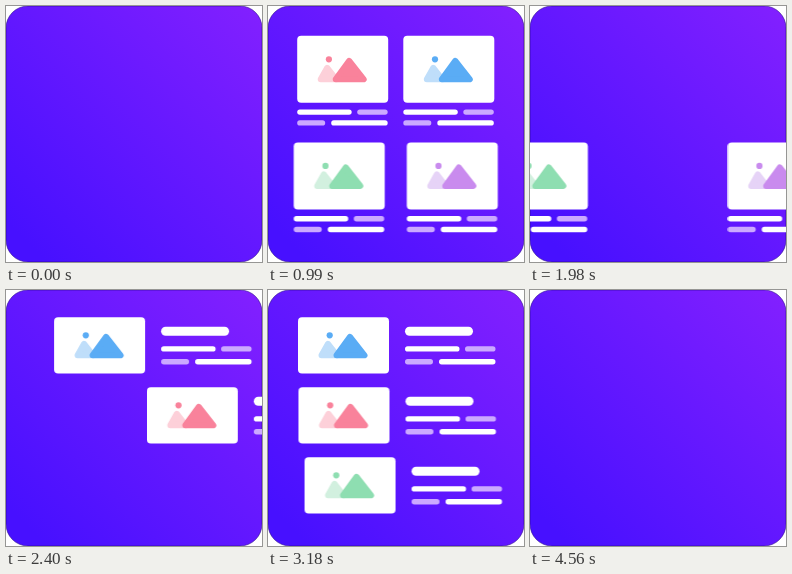
An HTML page that plays this animation: 256 by 256 pixels, repeating every 4620 ms.

```html
<!DOCTYPE html>
<html lang="en">
<head>
<meta charset="utf-8">
<title>Layout switch</title>
<style>
  html, body { margin: 0; width: 100%; height: 100%; overflow: hidden; background: #fff; }
  svg { display: block; width: 100vw; height: 100vh; }
</style>
</head>
<body>
<svg id="stage" viewBox="0 0 256 256">
  <defs>
    <linearGradient id="bg" x1="0" y1="1" x2="1" y2="0">
      <stop offset=".08" stop-color="#4710ff"/>
      <stop offset="1" stop-color="#8320ff"/>
    </linearGradient>
    <clipPath id="tile"><rect width="256" height="256" rx="22"/></clipPath>
  </defs>
  <rect width="256" height="256" rx="22" fill="url(#bg)" stroke="#2a0a8c" stroke-width=".6"/>
  <g id="scene" clip-path="url(#tile)"></g>
</svg>
<script>
const LOOP = 4620;
const WHITE = '#fff', LILAC = '#cba9ff';
const PINK = ['#f9829b', '#fdd0d9'];
const BLUE = ['#5aacf5', '#bfdefa'];
const GREEN = ['#8edeb1', '#d2f0df'];
const PURPLE = ['#c98bee', '#e6d3f7'];
const scene = document.getElementById('scene');

function add(parent, tag, attrs) {
  const el = document.createElementNS('http://www.w3.org/2000/svg', tag);
  for (const k in attrs) el.setAttribute(k, attrs[k]);
  return parent.appendChild(el);
}

function bar(g, x1, x2, y, h, fill) {
  add(g, 'rect', { x: x1, y: y - h / 2, width: x2 - x1, height: h, rx: h / 2, fill });
}

function hill(g, d, fill) {
  add(g, 'path', { d, fill, stroke: fill, 'stroke-width': 6, 'stroke-linejoin': 'round' });
}

function picture(g, h, [dark, light]) {
  add(g, 'rect', { width: 91, height: h, rx: 4, fill: WHITE });
  const icon = add(g, 'g', { transform: `translate(0 ${h / 2})` });
  hill(icon, 'M23.5 10L30 -1.5L39 10Z', light);
  hill(icon, 'M38.5 10L52 -8.5L66.5 10Z', dark);
  add(icon, 'circle', { cx: 31.7, cy: -10, r: 3.1, fill: dark });
}

function lines(g, x, y, gap) {
  bar(g, x, x + 54.5, y, 5.4, WHITE);
  bar(g, x + 60, x + 90.5, y, 5.4, LILAC);
  bar(g, x, x + 28, y + gap, 5.4, LILAC);
  bar(g, x + 34, x + 90.5, y + gap, 5.4, WHITE);
}

// Slide in, swing past, swing back, settle; later leave at constant speed.
function slide(g, from, to, start, leave, speed) {
  const out = 'cubic-bezier(.5, 1, .89, 1)', inOut = 'cubic-bezier(.37, 0, .63, 1)';
  const steps = [
    [0, from, 'linear'],
    [start, from, out],
    [start + 580, from * -.084, inOut],
    [start + 750, from * .029, inOut],
    [start + 980, 0, 'linear'],
    [leave, 0, 'linear'],
    [leave + Math.abs(to) / speed, to, 'linear'],
    [LOOP, to, 'linear']
  ];
  g.animate(steps.map(([t, x, easing]) => ({
    offset: t / LOOP, transform: `translateX(${x}px)`, easing
  })), { duration: LOOP, iterations: Infinity });
}

function holder(x, y) {
  const mover = add(scene, 'g', {});
  return [mover, add(mover, 'g', { transform: `translate(${x} ${y})` })];
}

function gridCard(x, y, colors, dist, start, leave) {
  const [mover, g] = holder(x, y);
  picture(g, 67, colors);
  lines(g, 0, 76.3, 10.8);
  slide(mover, dist, dist, start, leave, .6);
}

function listRow(y, colors, start, leave) {
  const [mover, g] = holder(30, y);
  picture(g, 56.3, colors);
  bar(g, 107, 175, 14, 9, WHITE);
  lines(g, 107, 31.7, 12.8);
  slide(mover, 228, -230, start, leave, .68);
}

gridCard(29.2, 29.8, PINK, -121, 15, 1655);
gridCard(135.3, 29.8, BLUE, 121, 0, 1655);
gridCard(29.2, 136.4, GREEN, -121, 245, 1877);
gridCard(135.3, 136.4, PURPLE, 121, 245, 1877);

listRow(27.2, BLUE, 2046, 3934);
listRow(97.2, PINK, 2241, 4069);
listRow(167.2, GREEN, 2436, 4205);
</script>
</body>
</html>
```
